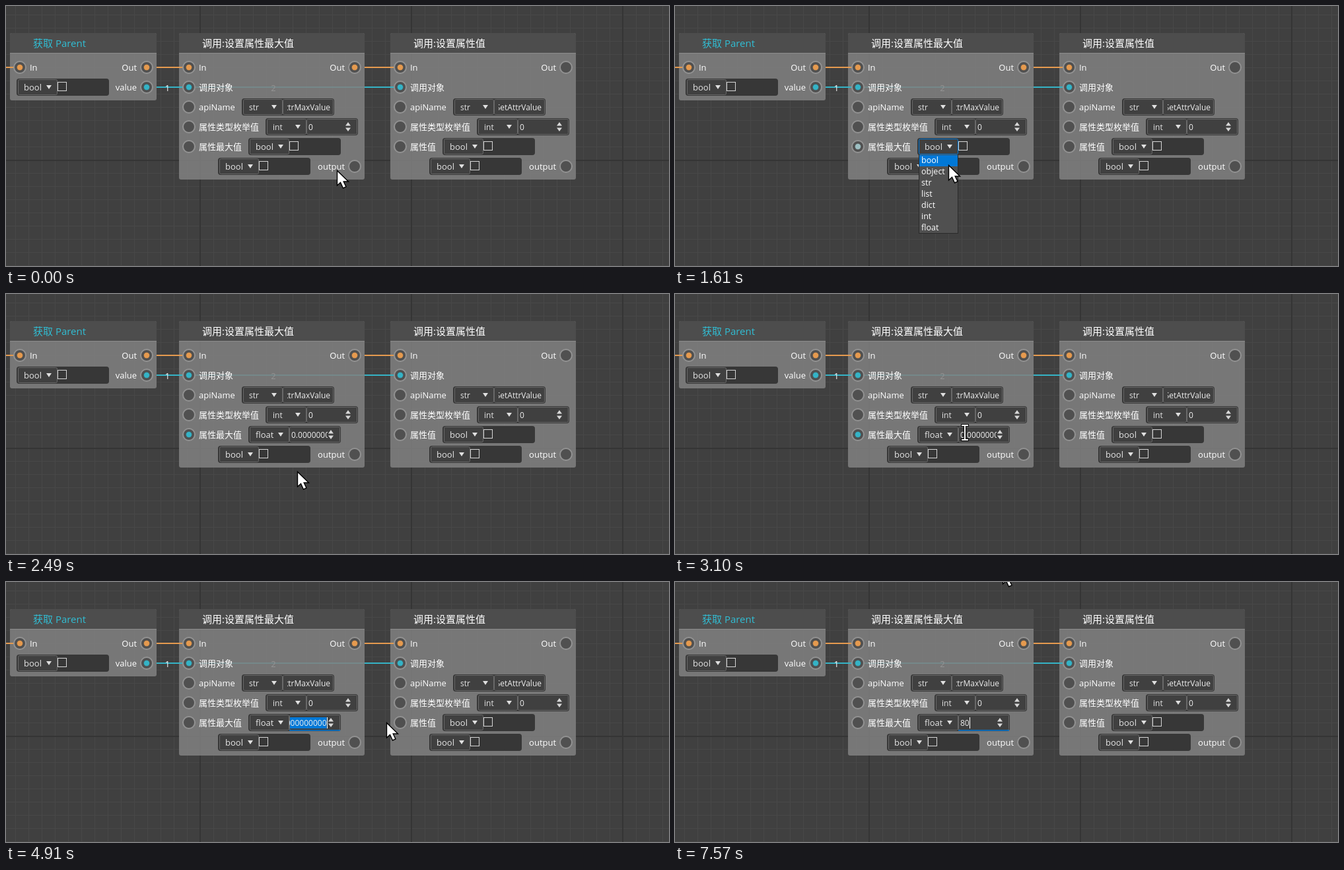
Animation of 1004x394 px, one loop 8 s. Source, as an HTML page with a canvas:

```html
<!DOCTYPE html>
<html lang="zh">
<head>
<meta charset="utf-8">
<title>Node editor</title>
<style>
html, body { margin: 0; width: 100%; height: 100%; overflow: hidden; background: #404040; }
canvas { display: block; }
</style>
</head>
<body>
<canvas id="stage" width="1004" height="394"></canvas>
<script>
const ctx = document.getElementById('stage').getContext('2d');
const LOOP = 8000;
const FONT = '"Open Sans", "Noto Sans CJK SC", "Noto Sans CJK", sans-serif';
const ORANGE = '#e59a4f', TEAL = '#35b3c6', PALE = '#9dbfc2', BLUE = '#0078d7';
const TYPES = ['bool', 'object', 'str', 'list', 'dict', 'int', 'float'];

// Pointer moves: start, end, steps, x, y
const MOVES = [
  [70, 280, 4, 427, 206],
  [740, 840, 2, 422, 197],
  [920, 1010, 2, 416, 210],
  [1470, 2030, 9, 408, 331],
  [2360, 2630, 4, 474, 206],
  [2960, 3100, 3, 439, 210],
  [3690, 3830, 3, 432, 209],
  [3900, 4440, 7, 579, 230],
  [4510, 4510, 1, 576, 213],
  [5900, 6180, 5, 496, -20]
];

// Typed value over time
const TYPED = [[5170, '08'], [5240, '080'], [6770, '08'], [7230, '0'], [7300, ''], [7500, '8'], [7570, '80']];

const between = (t, a, b) => t >= a && t < b;

function pointerAt(t) {
  let x = 501, y = 249;
  for (const [start, end, steps, tx, ty] of MOVES) {
    if (t < start) break;
    const gap = steps > 1 ? (end - start) / (steps - 1) : 1;
    const p = Math.min(1, (Math.floor((t - start) / gap + 1e-6) + 1) / steps);
    const k = p * p * (3 - 2 * p);
    x += (tx - x) * k;
    y += (ty - y) * k;
  }
  return { x: Math.round(x), y: Math.round(y) };
}

function text(str, x, y, size = 13, color = '#fff', align = 'left') {
  ctx.font = `${size}px ${FONT}`;
  ctx.fillStyle = color;
  ctx.textAlign = align;
  ctx.fillText(str, x, y);
}

function rect(x, y, w, h, color) {
  ctx.fillStyle = color;
  ctx.fillRect(x, y, w, h);
}

function box(x, y, w, h, r, fill, stroke) {
  ctx.beginPath();
  ctx.roundRect(x, y, w, h, r);
  if (fill) { ctx.fillStyle = fill; ctx.fill(); }
  if (stroke) { ctx.strokeStyle = stroke; ctx.lineWidth = 1; ctx.stroke(); }
}

function poly(points, fill) {
  ctx.beginPath();
  points.forEach(([x, y]) => ctx.lineTo(x, y));
  ctx.closePath();
  ctx.fillStyle = fill;
  ctx.fill();
}

function clipped(x, y, w, h, draw) {
  ctx.save();
  ctx.beginPath();
  ctx.rect(x, y, w, h);
  ctx.clip();
  draw();
  ctx.restore();
}

function grid() {
  rect(0, 0, 1004, 394, '#404040');
  for (let x = 14; x < 1004; x += 20) rect(x, 0, 1, 394, '#484848');
  for (let y = 13; y < 394; y += 20) rect(0, y, 1004, 1, '#484848');
  for (let x = 294; x < 1004; x += 320) rect(x - 1, 0, 2, 394, '#353535');
  rect(0, 233, 1004, 2, '#353535');
}

function port(x, y, color) {
  ctx.beginPath();
  ctx.arc(x, y, 9, 0, 7);
  ctx.fillStyle = '#505050';
  ctx.fill();
  ctx.strokeStyle = '#929292';
  ctx.lineWidth = 2;
  ctx.stroke();
  if (!color) return;
  ctx.beginPath();
  ctx.arc(x, y, 4.5, 0, 7);
  ctx.fillStyle = color;
  ctx.fill();
  ctx.strokeStyle = 'rgba(60,60,60,.3)';
  ctx.lineWidth = 1;
  ctx.stroke();
}

function nodeFrame(x, w, h, title, color = '#fff') {
  box(x, 41, w, h, 3, 'rgba(128,128,128,.85)');
  box(x, 41, w, 31, [3, 3, 0, 0], '#4d4d4d');
  rect(x, 71, w, 1, '#8c8c8c');
  text(title, x + 35, 62, 15, color);
}

function input(x, row, label, color) {
  port(x, row, color);
  text(label, x + 15, row + 5);
}

function output(x, row, label, color) {
  port(x, row, color);
  text(label, x - 15, row + 5, 13, '#fff', 'right');
}

// A type selector followed by the editor for that type
function field(x, row, type, opts = {}) {
  const y = row - 13;
  box(x, y, 140, 26, 4, '#373737');
  box(x + 2.5, y + 1.5, 59, 23, 2, '#404040', opts.open ? BLUE : '#696969');
  const size = type === 'str' || type === 'int' ? 12 : 13;
  text(type, x + 11, row + 4.5, size, opts.pressed ? '#a8a8a8' : '#e4e4e4');
  if (!opts.pressed) poly([[x + 45, row - 3], [x + 53, row - 3], [x + 49, row + 3]], '#e0e0e0');
  else poly([[x + 45, row - 3], [x + 53, row - 3], [x + 49, row + 3]], '#a8a8a8');

  if (type === 'bool') {
    ctx.strokeStyle = '#d6d6d6';
    ctx.lineWidth = 1;
    ctx.strokeRect(x + 62.5, row - 7.5, 13, 13);
    return;
  }
  box(x + 62.5, y + 1.5, 76, 23, 2, '#404040', '#696969');
  if (type === 'str') {
    clipped(x + 69, y, 68, 26, () => text(opts.value, x + 134, row + 4.5, 12, '#eee', 'right'));
    return;
  }
  if (opts.draw) opts.draw();
  else text('0', x + 65, row + 4.5, 12, '#eee');
  const ax = x + 125;
  poly([[ax - 4, row - 1.5], [ax + 4, row - 1.5], [ax, row - 7]], '#d8d8d8');
  poly([[ax - 4, row + 1.5], [ax + 4, row + 1.5], [ax, row + 7]], '#d8d8d8');
  if (opts.focus) rect(x + 62, row + 11, 77, 1.5, BLUE);
}

function floatEditor(t, pointer) {
  const typed = TYPED.filter(([at]) => t >= at).pop();
  const value = typed ? typed[1] : '0.0000000000';
  const left = 432, base = 217.5;
  clipped(429, 203, 58, 21, () => {
    ctx.font = `12px ${FONT}`;
    const width = ctx.measureText(value).width;
    const dragging = between(t, 3690, 5170);
    let scroll = 0, caret = left + width;
    if (dragging) {
      const overshoot = t >= 4440 ? 1 : Math.max(0, Math.min(1, (pointer.x - 486) / 40));
      scroll = overshoot * (left + width - 485.5);
      caret = t >= 4440 ? 485.5 : Math.min(pointer.x, 485.5);
      const from = Math.max(430, left - scroll);
      if (caret > from) rect(from, 205, caret - from, 17, BLUE);
    }
    text(value, left - scroll, base, 12, '#eee');
    const hidden = t < 3690 || between(t, 4510, 4910) || between(t, 5900, 6440);
    if (!hidden) rect(Math.round(caret), 205, 1, 17, '#fff');
  });
}

function links() {
  rect(0, 92, 14, 2, ORANGE);
  rect(228, 122, 369, 2, TEAL);
  text('1', 244.5, 129, 13, '#fff', 'center');
  text('2', 405, 129, 13, '#fff', 'center');
}

function nodes(t, pointer) {
  nodeFrame(6, 222, 102, '获取 Parent', '#31bdd3');
  nodeFrame(262, 281, 222, '调用:设置属性最大值');
  nodeFrame(582, 281, 222, '调用:设置属性值');

  rect(6, 92, 8, 2, ORANGE);
  rect(228, 92, 42, 2, ORANGE);
  rect(543, 92, 47, 2, ORANGE);
  rect(262, 122, 8, 2, TEAL);
  rect(582, 122, 8, 2, TEAL);

  input(21, 93, 'In', ORANGE);
  output(213, 93, 'Out', ORANGE);
  output(213, 123, 'value', TEAL);
  field(16, 123, 'bool');

  const isFloat = t >= 2360;
  const hover = between(t, 210, 4510) ? (isFloat ? TEAL : PALE) : null;
  for (const x of [277, 597]) {
    const first = x === 277;
    input(x, 93, 'In', ORANGE);
    input(x, 123, '调用对象', TEAL);
    input(x, 153, 'apiName');
    input(x, 183, '属性类型枚举值');
    input(x, 213, first ? '属性最大值' : '属性值', first ? hover : null);
    output(x + 251, 93, 'Out', first ? ORANGE : null);
    output(x + 251, 243, 'output');
    field(x + 80, 153, 'str', { value: first ? 'SetAttrMaxValue' : 'SetAttrValue' });
    field(x + 116, 183, 'int');
    field(x + 44, 243, 'bool');
  }
  field(367, 213, isFloat ? 'float' : 'bool', {
    open: between(t, 1140, 2360),
    pressed: between(t, 1010, 1140),
    focus: t >= 3690,
    draw: () => floatEditor(t, pointer)
  });
  field(661, 213, 'bool');
}

function popup(pointer) {
  rect(369, 225, 60, 120, '#2b2b2b');
  rect(370, 225, 58, 119, '#505050');
  const current = Math.max(0, Math.min(6, Math.floor((pointer.y - 225) / 17)));
  TYPES.forEach((type, i) => {
    const y = 225 + i * 17;
    if (i === current) rect(370, y + 1, 58, 17, BLUE);
    text(type, 373, y + 13, 12.5);
  });
}

function arrow({ x, y }) {
  ctx.save();
  ctx.translate(x + .5, y + .5);
  ctx.beginPath();
  [[0, 0], [0, 22.5], [5, 18], [9, 26.5], [13.5, 24.5], [9.7, 16.5], [17, 16.5]]
    .forEach(([px, py]) => ctx.lineTo(px, py));
  ctx.closePath();
  ctx.fillStyle = '#fff';
  ctx.fill();
  ctx.strokeStyle = '#000';
  ctx.lineWidth = 1.4;
  ctx.stroke();
  ctx.restore();
}

function beam({ x, y }) {
  for (const [color, width, reach] of [['#000', 4, 1], ['#fff', 2, 0]]) {
    ctx.strokeStyle = color;
    ctx.lineWidth = width;
    ctx.beginPath();
    ctx.moveTo(x, y - 11);
    ctx.lineTo(x, y + 11);
    for (const end of [-11, 11]) {
      ctx.moveTo(x - 5 - reach, y + end);
      ctx.lineTo(x + 5 + reach, y + end);
    }
    ctx.stroke();
  }
}

function render(t) {
  const pointer = pointerAt(t);
  grid();
  links();
  nodes(t, pointer);
  if (between(t, 1140, 2360)) popup(pointer);
  if (between(t, 2630, 4510)) beam(pointer);
  else arrow(pointer);
}

const began = performance.now();
function tick() {
  render((performance.now() - began) % LOOP);
  requestAnimationFrame(tick);
}
tick();
</script>
</body>
</html>
```
